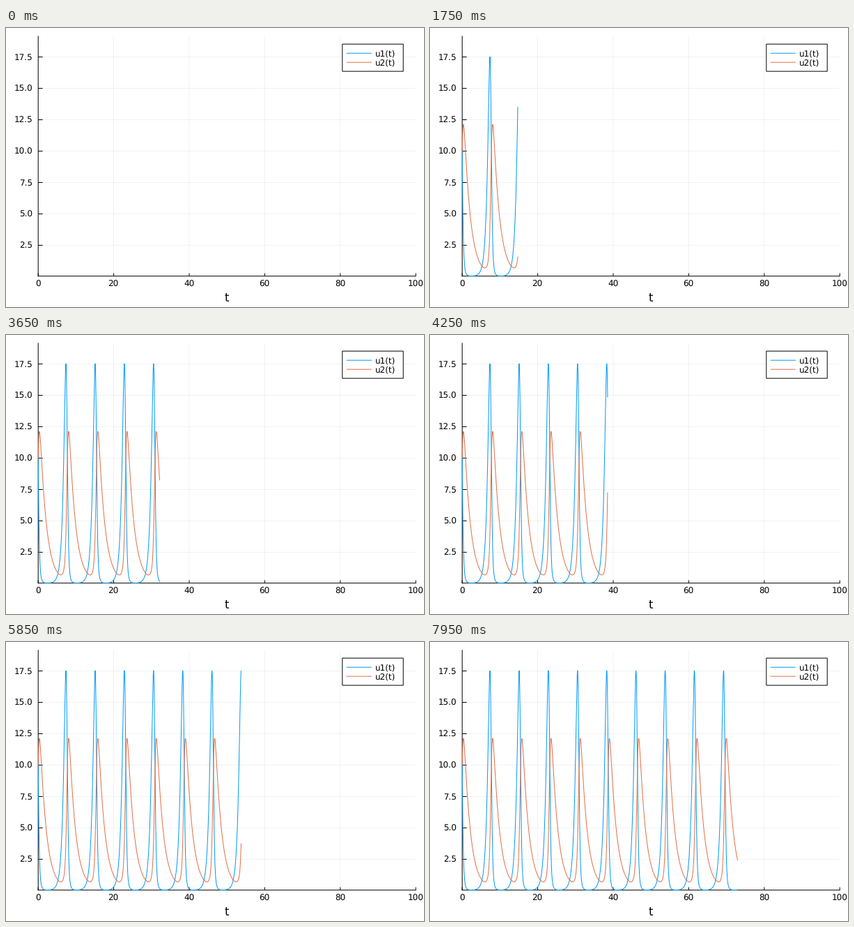
A matplotlib script for the animation above (8 s loop, 600x400 px).

```python
import numpy as np
import matplotlib.pyplot as plt
from matplotlib.animation import FuncAnimation
from matplotlib.patches import Rectangle

W, H, DPI = 600, 400, 100
FRAMES, INTERVAL = 160, 50
LEFT, RIGHT, TOP, BOTTOM = 46.2, 588.2, 11.8, 355.7
X_MAX, Y_LOW, Y_HIGH = 100, 0.047, 19.15
BLUE, ORANGE = "#009afa", "#e36f47"
PT = 72 / DPI  # points per pixel

plt.rcParams.update({"font.family": "DejaVu Sans", "path.snap": False,
                     "text.hinting": "none"})


def flow(u):
    """Lotka-Volterra: prey x and predator y."""
    x, y = u
    return np.array([2 * x - 0.5 * x * y, 0.2 * x * y - 0.6 * y])


def solve(u, end, h):
    """Classic fourth-order Runge-Kutta."""
    path = [u]
    for _ in range(round(end / h)):
        a = flow(u)
        b = flow(u + h / 2 * a)
        c = flow(u + h / 2 * b)
        d = flow(u + h * c)
        u = u + h / 6 * (a + 2 * b + 2 * c + d)
        path.append(u)
    return np.array(path)


STEP = 0.005
path = solve(np.array([10.0, 10.0]), 76, STEP)
t = STEP * np.arange(len(path))

# Drawing slows while predators are many, and starts with short steps.
clock = 2.104 * t - 0.3 * np.log(path[:, 0] / 10) + 4.1 * (1 - np.exp(-4 * t))
times = np.interp(np.arange(FRAMES), clock, t)

fig = plt.figure(figsize=(W / DPI, H / DPI), dpi=DPI, facecolor="white")
ax = fig.add_axes([LEFT / W, 1 - BOTTOM / H, (RIGHT - LEFT) / W, (BOTTOM - TOP) / H])
ax.set(xlim=(0, X_MAX), ylim=(Y_LOW, Y_HIGH),
       xticks=np.arange(0, 101, 20), yticks=np.arange(2.5, 18, 2.5))
ax.patch.set_visible(False)
ax.set_axisbelow(True)
ax.grid(color="black", alpha=0.1, lw=0.5 * PT)
ax.tick_params(length=0, labelbottom=False, labelleft=False)
ax.spines[["top", "right"]].set_visible(False)
ax.spines[["left", "bottom"]].set(linewidth=PT, zorder=1.5)


def label(x, y, s, size=12, ha="center"):
    fig.text(x / W, 1 - y / H, s, fontsize=size * PT, ha=ha, va="baseline", zorder=6)


def rule(x0, y0, x1, y1, color="black", zorder=-1):
    fig.add_artist(plt.Line2D([x0 / W, x1 / W], [1 - y0 / H, 1 - y1 / H], color=color,
                              lw=PT, solid_capstyle="butt", zorder=zorder))


for v in ax.get_xticks():
    x = LEFT + (RIGHT - LEFT) * v / X_MAX
    rule(x, BOTTOM, x, BOTTOM - 0.012 * (BOTTOM - TOP))
    label(x - 0.4, 371, f"{v:.0f}")
for v in ax.get_yticks():
    y = BOTTOM - (BOTTOM - TOP) * (v - Y_LOW) / (Y_HIGH - Y_LOW)
    rule(LEFT, y, LEFT + 0.012 * (RIGHT - LEFT), y)
    label(38, y + 4.5, f"{v:.1f}", ha="right")
label(317, 392, "t", 16.5)

fig.add_artist(Rectangle((482.8 / W, 1 - 62.1 / H), 87.4 / W, 39 / H,
                         fc="white", ec="black", lw=PT, zorder=5))
for name, y, color in (("u1(t)", 36.2, BLUE), ("u2(t)", 49.2, ORANGE)):
    rule(488.7, y, 524.8, y, color, 6)
    label(530, y + 4.5, name, ha="left")

curves = [ax.plot([], [], color=c, lw=PT, zorder=3)[0] for c in (BLUE, ORANGE)]


def draw(n):
    end = np.searchsorted(t, times[n])
    for curve, values in zip(curves, path.T):
        curve.set_data(t[:end], values[:end])
    return curves


anim = FuncAnimation(fig, draw, frames=FRAMES, interval=INTERVAL, repeat=True,
                     repeat_delay=0, blit=False)
plt.show()
```
